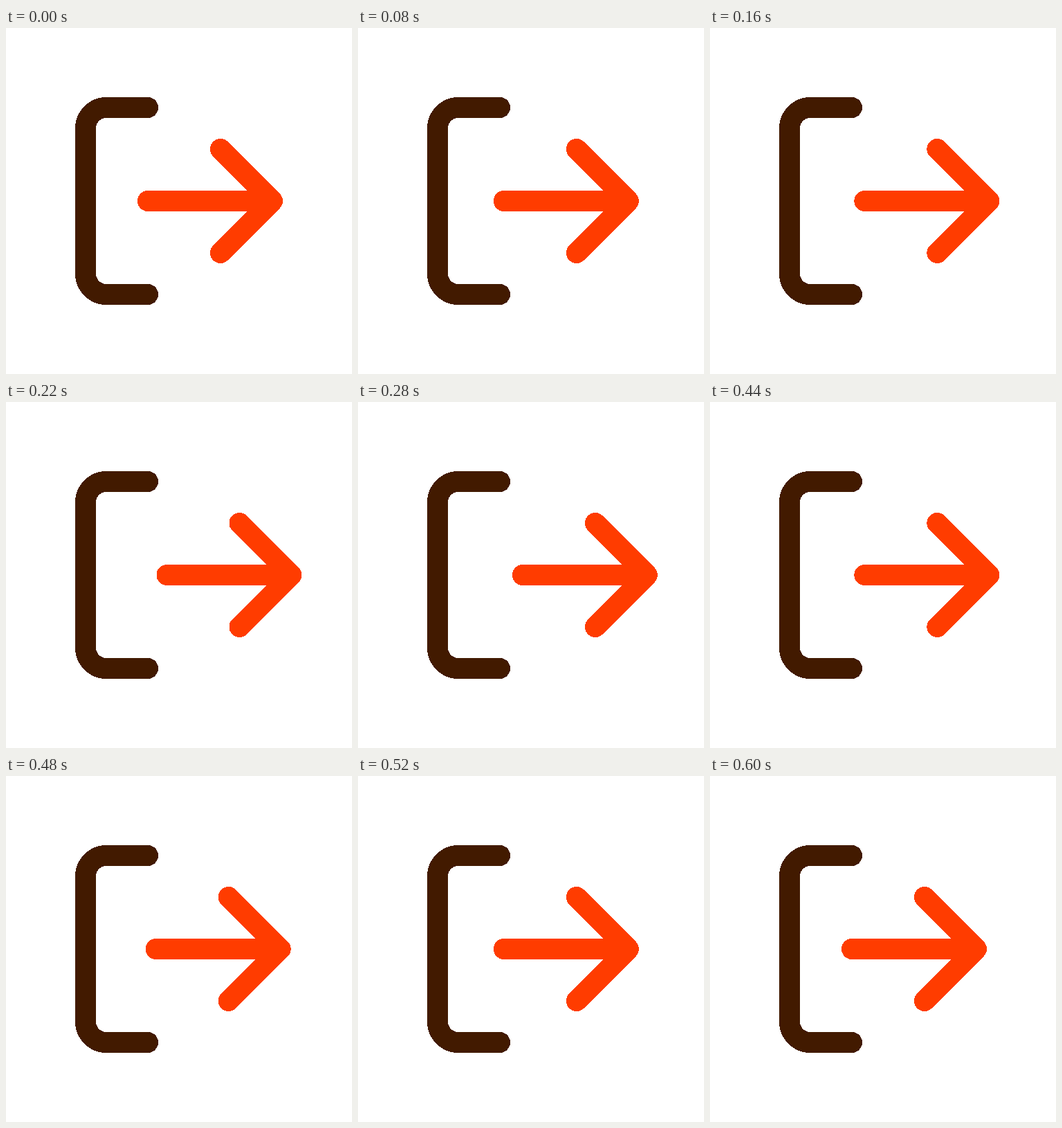
Recreate the animation shown at these times as an HTML page. Size 500x500 px, loop 820 ms.

```html
<!DOCTYPE html>
<html lang="en">
<head>
<meta charset="utf-8">
<title>Exit arrow</title>
<style>
  html, body { margin: 0; width: 100%; height: 100%; overflow: hidden; background: #fff; }
  svg { display: block; width: 100%; height: 100%; }
  path {
    fill: none;
    stroke-width: 30;
    stroke-linecap: round;
    stroke-linejoin: round;
    shape-rendering: crispEdges;
  }
</style>
</head>
<body>
<svg viewBox="0 0 500 500">
  <path stroke="#421a00" d="M205 115H145A30 30 0 0 0 115 145V355A30 30 0 0 0 145 385H205"/>
  <path id="arrow" stroke="#ff3c00" d="M205 250H385M310 175L385 250L310 325"/>
</svg>
<script>
  const LOOP = 820, HALF = 300, STEP = 20, REACH = 33.33;
  const arrow = document.getElementById('arrow');
  const start = performance.now();

  const ease = p => p * p * (3 - 2 * p);

  // Out and back around HALF, then rest until the loop ends.
  function offset(t) {
    const p = Math.max(0, 1 - Math.abs(t - HALF) / HALF);
    return REACH * ease(p);
  }

  function draw(now) {
    const t = Math.max(0, now - start) % LOOP;
    const held = Math.floor(t / STEP) * STEP;
    arrow.setAttribute('transform', `translate(${offset(held).toFixed(2)} 0)`);
    requestAnimationFrame(draw);
  }

  draw(start);
</script>
</body>
</html>
```
